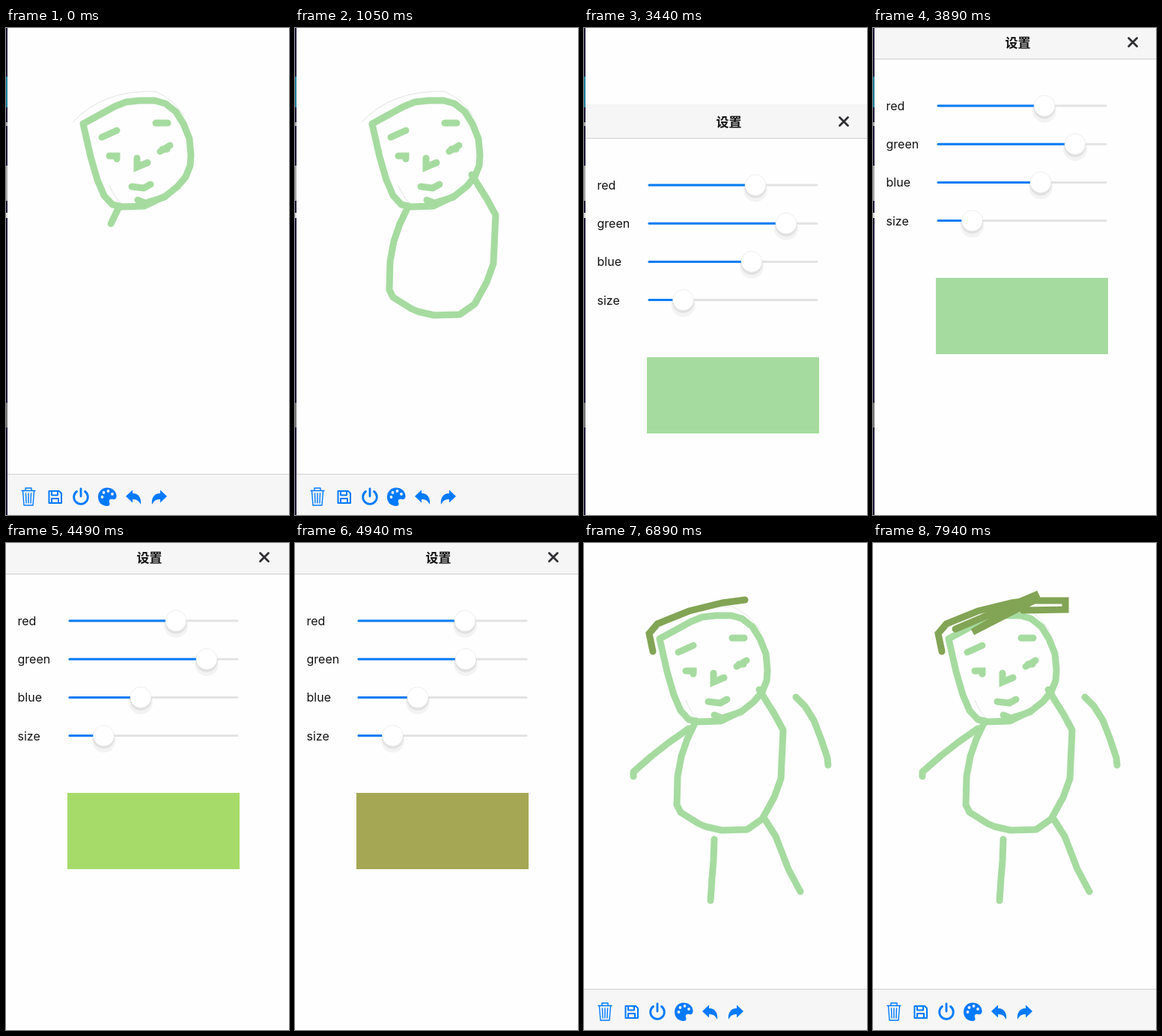
Animation, 378 px wide and 651 px high, one loop 8000 ms. Source, as an HTML page:

```html
<!DOCTYPE html>
<html lang="en">
<head>
<meta charset="utf-8">
<title>Drawing app</title>
<style>
  html, body { margin: 0; width: 100%; height: 100%; overflow: hidden; background: #fefefe; }
  svg { display: block; width: 378px; height: 651px; }
  .ink { fill: none; stroke: #a6dba0; stroke-width: 9; stroke-linecap: round; stroke-linejoin: round; }
  .sharp { stroke-linejoin: miter; }
  .hair { stroke: #82a455; }
  .guide { fill: none; stroke: #d9ddd9; stroke-width: .8; }
  .line { fill: none; stroke: #007aff; stroke-linecap: round; stroke-linejoin: round; }
  .solid { fill: #007aff; }
  .label { font: 16px Inter, "Open Sans", sans-serif; fill: #111; }
  .title { font: 600 17px "Noto Sans CJK SC", "Noto Sans CJK", sans-serif; fill: #111; text-anchor: middle; }
</style>
</head>
<body>
<svg viewBox="0 0 378 651">
  <!-- desktop edge behind the window -->
  <rect width="3" height="651" fill="#211a38"/>
  <rect y="65" width="3" height="41" fill="#1c7f9c"/>
  <rect y="126" width="3" height="5" fill="#aaa"/>
  <rect y="184" width="3" height="47" fill="#aaa"/>
  <rect y="247" width="3" height="7" fill="#ddd"/>
  <rect y="501" width="3" height="33" fill="#777"/>

  <g id="window">
    <rect x="2" width="380" height="651" fill="#fefefe"/>

    <path class="guide" d="M89 126Q130 82 200 85Q224 95 238 118M138 210Q146 230 158 238M214 225Q232 214 240 199"/>
    <g class="ink">
      <path d="M103 128L125 116L145 105L160 99L178 97L199 97L213 101L227 112L237 128L245 148L247 170L246 184L240 199L229 212L214 224L185 238L155 239L142 236L131 224L122 203L113 172Z"/>
      <path d="M176 230L186 234L212 226M128 146L148 137M200 127H216M206 165L219 157M209 162H215M168 212L184 214L193 209"/>
      <path class="sharp" d="M138 171H148V175M175 174V186L189 180"/>
      <path id="body" d="M150 241L140 262L132 285L127 312L126 350L131 360L155 375L164 379L186 384L220 383L240 369L256 340L265 315L268 250L256 228L236 196"/>
      <path id="leftArm" d="M142 248L115 267L92 285L68 306V312"/>
      <path id="rightArm" d="M285 206L297 218L309 237L319 263L327 287L328 297"/>
      <path id="leftLeg" d="M176 396L175 424L173 448L171 478"/>
      <path id="rightLeg" d="M244 370L258 392L275 436L291 466"/>
    </g>
    <g class="ink sharp hair" transform="translate(2)">
      <path id="fringe" d="M92 145L87 121L98 108L140 91L185 80L215 76"/>
      <path id="tuft" d="M110 115L150 98L221 68L133 119L215 77L257 77V89L200 90"/>
    </g>

    <rect x="2" y="596" width="380" height="55" fill="#f6f6f6"/>
    <path d="M2 596.5H382" stroke="#d0d0d0"/>
    <g class="line" stroke-width="1.4">
      <path d="M21 618.5H39M26 618V615H34V618M22.5 619L24 638H36L37.500 619M26.500 622L27 635M30 622V635M33.500 622L33 635"/>
      <path stroke-width="2" d="M57.500 619H71L74 622V635H57.500ZM61 619V624.500H69V619M61 635V629H70V635"/>
      <path stroke-width="2.800" d="M100 616V626M94.500 619.500A9.300 9.300 0 1 0 105.500 619.500"/>
    </g>
    <g id="palette">
      <path class="solid" d="M135 614.500C128 614.500 123 620 123 627C123 634 128 639 135 639C139 639 139 636 138 634C137 630 140 629 143 630C146 631 148 628 147.500 625C147 619 142 614.500 135 614.500Z"/>
      <g fill="#f6f6f6">
        <circle cx="128.500" cy="627" r="1.900"/><circle cx="130.500" cy="621" r="1.900"/>
        <circle cx="136.500" cy="619" r="1.900"/><circle cx="142" cy="623" r="1.900"/>
      </g>
    </g>
    <path id="undo" class="solid" d="M160 626L169 617.500V622C177 622 181 628 180 637C177 631 174 630 169 630V634.500Z"/>
    <use href="#undo" transform="translate(375) scale(-1 1)"/>

    <g id="sheet">
      <rect x="2" y="-24" width="380" height="680" fill="#fefefe"/>
      <rect x="2" y="-4" width="380" height="45" fill="#f6f6f6"/>
      <path d="M2 41.500H382" stroke="#cfcfcf"/>
      <text class="title" x="193.500" y="25.500">设置</text>
      <path id="close" d="M341.500 13.500L352.500 24.500M352.500 13.500L341.500 24.500" stroke="#2e2e33" stroke-width="2.800" stroke-linecap="round"/>
      <g id="sliders"></g>
      <rect id="swatch" x="84" y="334" width="230" height="102"/>
    </g>
  </g>
</svg>
<script>
const LOOP = 8000;
const $ = id => document.getElementById(id);

// Values hold from their start time until the next entry; `gap` separates entries.
const steps = (initial, start, ...values) => ({ initial, start, values, gap: 150 });
const valueAt = (track, t) => {
  const i = Math.floor((t - track.start) / track.gap);
  return i < 0 ? track.initial : track.values[Math.min(i, track.values.length - 1)];
};

const strokes = {
  body: steps(.053, 150, .13, .28, .43, .58, .73, .88, 1),
  leftArm: steps(0, 1200, .5, 1),
  rightArm: steps(0, 1790, .5, 1),
  leftLeg: steps(0, 2240, .63, 1),
  rightLeg: steps(0, 2540, .5, 1),
  fringe: steps(0, 6590, .3, .7, 1),
  tuft: steps(0, 7040, .25, .48, .7, .84, .89, .95, 1)
};

const HIDDEN = 675;
const opening = steps(HIDDEN, 3290, 355, 106, 25, 5, 0);
const closing = steps(0, 5990, 320, 570, HIDDEN);

const knobs = {
  red: steps(229, 5390, 201),
  green: steps(270, 4940, 230, 227),
  blue: steps(224, 4340, 206, 182, 166),
  size: steps(132.5, 0, 132.5)
};

$('sliders').innerHTML = Object.keys(knobs).map((name, i) => `
  <g transform="translate(0 ${104 + i * 51.2})">
    <text class="label" x="17.500" y="6">${name}</text>
    <path d="M87 0H311" stroke="#e3e3e3" stroke-width="3" stroke-linecap="round"/>
    <path id="${name}Fill" stroke="#087cf5" stroke-width="3" stroke-linecap="round"/>
    <g id="${name}Knob">
      <circle cy="6.500" r="16" opacity=".045"/>
      <circle cy="3" r="14.500" opacity=".07"/>
      <circle r="14" fill="#fff" stroke="#e6e6e6" stroke-width=".7"/>
    </g>
  </g>`).join('');

for (const id in strokes) $(id).setAttribute('pathLength', 1);

function draw(t) {
  for (const id in strokes) {
    const shown = valueAt(strokes[id], t);
    $(id).style.display = shown ? '' : 'none';
    $(id).style.strokeDasharray = shown < 1 ? `${shown} 2` : 'none';
  }

  const channel = {};
  for (const name in knobs) {
    const x = valueAt(knobs[name], t);
    channel[name] = Math.round((x - 100) / 198 * 255);
    $(name + 'Fill').setAttribute('d', `M87 0H${x}`);
    $(name + 'Knob').setAttribute('transform', `translate(${x})`);
  }
  $('swatch').setAttribute('fill', `rgb(${channel.red},${channel.green},${channel.blue})`);

  const offset = valueAt(t < 5000 ? opening : closing, t);
  $('sheet').setAttribute('transform', `translate(0 ${offset})`);
  $('window').setAttribute('transform', `translate(${t < 4340 ? 0 : -2})`);
  $('palette').style.opacity = t >= 2990 && t < 3290 ? .5 : 1;
  $('close').style.opacity = t >= 5840 && t < 5990 ? .4 : 1;
}

const origin = performance.now();
function tick() {
  draw((performance.now() - origin) % LOOP);
  requestAnimationFrame(tick);
}
tick();
</script>
</body>
</html>
```
